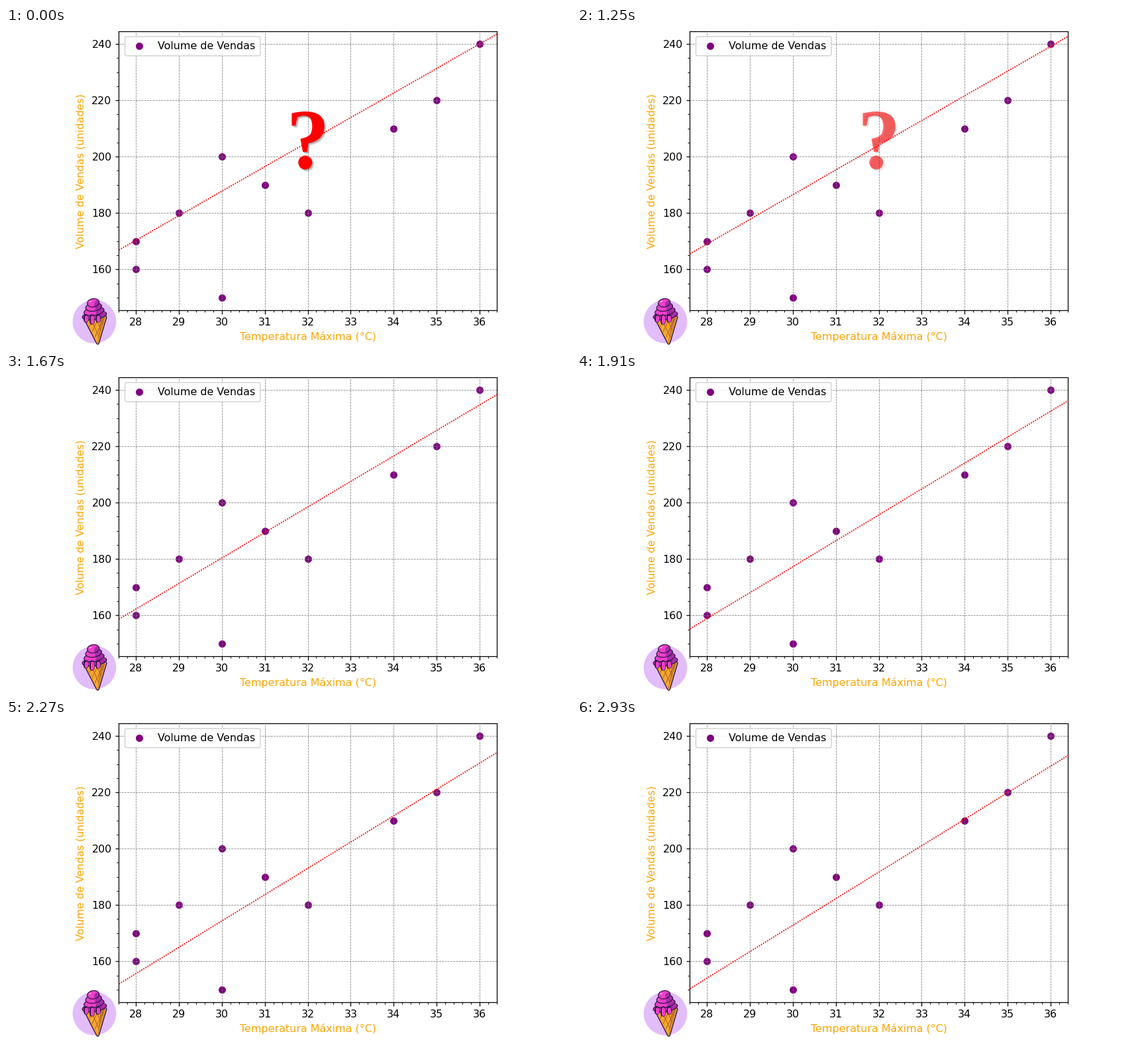
These frames come from a looping animation (853 px wide and 480 px high, 4.13 s). A matplotlib script:

```python
import numpy as np
import matplotlib.pyplot as plt
from matplotlib.animation import FuncAnimation
from matplotlib.patches import Circle, Ellipse, FancyBboxPatch, PathPatch, Polygon
from matplotlib.path import Path
from matplotlib.textpath import TextPath
from matplotlib.ticker import AutoMinorLocator, MultipleLocator

W, H, DPI = 853, 480, 64
PX = 72 / DPI                      # points per pixel
FRAMES, INTERVAL = 118, 35
START, STEP, STEPS = 1010, 60, 31  # the line moves in steps of 60 ms
FADE = 0.31                        # part of the move in which the mark fades

RED, INK = "#ff0000", "#25143f"
PINK, PLUM, PALE = "#ee3fcb", "#a52ba8", "#fba6ea"
CONE, CRUST, WAFFLE = "#f7a62f", "#cb7f35", "#a8601f"

TEMPS = [28, 28, 29, 30, 30, 31, 32, 34, 35, 36]
SALES = [160, 170, 180, 150, 200, 190, 180, 210, 220, 240]

plt.rcParams["font.family"] = "DejaVu Sans"
plt.rcParams["font.size"] = 15.9 * PX

fig = plt.figure(figsize=(W / DPI, H / DPI), dpi=DPI, facecolor="white")


def make_chart():
    left, right, top, bottom = 170.25, 740.75, 4.9, 425.9
    ax = fig.add_axes([left / W, 1 - bottom / H,
                       (right - left) / W, (bottom - top) / H])
    ax.set_xlim(27.6, 36.4)
    ax.set_ylim(145.5, 244.5)
    ax.xaxis.set_major_locator(MultipleLocator(1))
    ax.yaxis.set_major_locator(MultipleLocator(20))
    ax.xaxis.set_minor_locator(AutoMinorLocator(5))
    ax.yaxis.set_minor_locator(AutoMinorLocator(4))
    ax.tick_params(which="major", length=5.5 * PX, width=1.25 * PX, pad=5.2 * PX)
    ax.tick_params(which="minor", length=3.2 * PX, width=0.95 * PX)
    for spine in ax.spines.values():
        spine.set_linewidth(1.25 * PX)
    ax.set_axisbelow(False)
    ax.grid(True, color="gray", linestyle="--", linewidth=0.8 * PX)
    ax.plot(TEMPS, SALES, "o", color="purple", ms=11 * PX, mew=0, snap=False)


def make_stage():
    """Transparent layer whose units are pixels, y downwards."""
    ax = fig.add_axes([0, 0, 1, 1])
    ax.set_xlim(-0.5, W - 0.5)
    ax.set_ylim(H - 0.5, -0.5)
    ax.axis("off")
    return ax


make_chart()
stage = make_stage()


def add_labels():
    stage.text(455, 471, "Temperatura Máxima (°C)", color="orange",
               ha="center", va="baseline")
    stage.text(116.7, 215.7, "Volume de Vendas (unidades)", color="orange",
               rotation=90, rotation_mode="anchor", ha="center",
               va="baseline", fontsize=15.8 * PX)
    stage.add_patch(FancyBboxPatch(
        (179, 12.4), 204.5, 29, boxstyle="round,pad=0,rounding_size=3.2",
        fc="white", ec="#cccccc", lw=1.5 * PX, alpha=0.85, zorder=2))
    stage.plot([200.3], [26.3], "o", color="purple", ms=11 * PX, mew=0,
               snap=False)
    stage.text(228.7, 31.2, "Volume de Vendas", va="baseline")


def stroke(xs, ys, color, lw, z):
    line, = stage.plot(xs, ys, color=color, lw=lw * PX, zorder=z,
                       solid_capstyle="round")
    return line


def add_cone():
    left, right, tip = (118.5, 437), (149.5, 436), (138, 475)
    for color, lw in ((INK, 5), (CONE, 2.4)):
        body = stage.add_patch(Polygon([left, right, tip], fc=CONE, ec=color,
                                       lw=lw * PX, joinstyle="round", zorder=3.1))
    stage.add_patch(Polygon([(142, 436), right, tip], fc=CRUST, zorder=3.2))
    for k in range(5):
        for x, lean in ((110 + 8 * k, 20), (124 + 8 * k, -20)):
            stroke([x, x + lean], [436, 478], WAFFLE, 0.9, 3.3).set_clip_path(body)


def add_scoop(x, y, w, h, z):
    def blob(dx, dy, sw, sh, **kw):
        return stage.add_patch(Ellipse((x + dx * w, y + dy * h), sw * w, sh * h,
                                       angle=-9, **kw))

    body = blob(0, 0, 1, 1, fc=PINK, zorder=z)
    blob(0.38, 0.2, 0.6, 1, fc=PLUM, zorder=z).set_clip_path(body)
    blob(-0.25, -0.15, 0.25, 0.14, fc=PALE, zorder=z)
    blob(0, 0, 1, 1, fc="none", ec=INK, lw=1.2 * PX, zorder=z)


def add_icon():
    stage.add_patch(Circle((133, 442.6), 32.8, fc="#e2bcfb", zorder=3))
    add_cone()
    for color, lw in ((INK, 7.5), (PINK, 5)):
        for k in range(3):
            x = 120.5 + 9 * k
            stroke([x, x], [435, 440 + 3 * (k % 2)], color, lw, 3.8)
    for k in range(4):
        add_scoop(133 - 0.6 * k, 433.5 - 6.4 * k, 37 - 6.3 * k, 12.5, 3.5 + 0.1 * k)
    # rim drips lie over the lowest scoop's outline
    for k in range(3):
        x = 120.5 + 9 * k
        stroke([x, x], [434.5, 440 + 3 * (k % 2)], PINK, 5, 3.55)


def add_question():
    """Returns (patch, full alpha, fade power) for the shadow and the mark."""
    glyph = TextPath((0, 0), "?", size=100,
                     prop={"family": "Liberation Serif", "weight": "bold"})
    box = glyph.get_extents()
    scale = 87.5 / box.height
    pts = (glyph.vertices - [(box.x0 + box.x1) / 2, box.y0]) * [scale, -scale]
    parts = []

    def layer(shift, color, z, full, power):
        path = Path(pts + [455.5 + shift, 213 + shift], glyph.codes)
        patch = PathPatch(path, fc=color, ec="none", zorder=z)
        parts.append((stage.add_patch(patch), full, power))

    for shift in np.linspace(1, 3.1, 4):
        layer(shift, "#606060", 5, 0.17, 2)
    layer(0, RED, 5.1, 1, 1)
    return parts


add_labels()
add_icon()
question = add_question()
trend, = stage.plot([], [], color=RED, lw=1.8 * PX, zorder=6,
                    linestyle=(0, (1, 1)), dash_capstyle="butt")


def ease(u, x1=0.27, x2=0.35):
    """Cubic Bezier easing with level ends."""
    s = np.linspace(0, 1, 400)
    x = 3 * s * (1 - s) ** 2 * x1 + 3 * s ** 2 * (1 - s) * x2 + s ** 3
    return np.interp(u, x, 3 * s ** 2 - 2 * s ** 3)


def update(i):
    t = (i + 1) * INTERVAL - 1
    u = np.clip((t - START) // STEP / STEPS, 0, 1)
    p = ease(u)
    trend.set_data([170, 741], [334.6 + 70.4 * p, 8.4 + 44.5 * p])
    shown = max(0.0, 1 - u / FADE)
    for patch, full, power in question:
        patch.set_alpha(full * shown ** power)
    return [trend] + [part[0] for part in question]


anim = FuncAnimation(fig, update, frames=FRAMES, interval=INTERVAL,
                     repeat=True, repeat_delay=0, blit=False)
plt.show()
```
